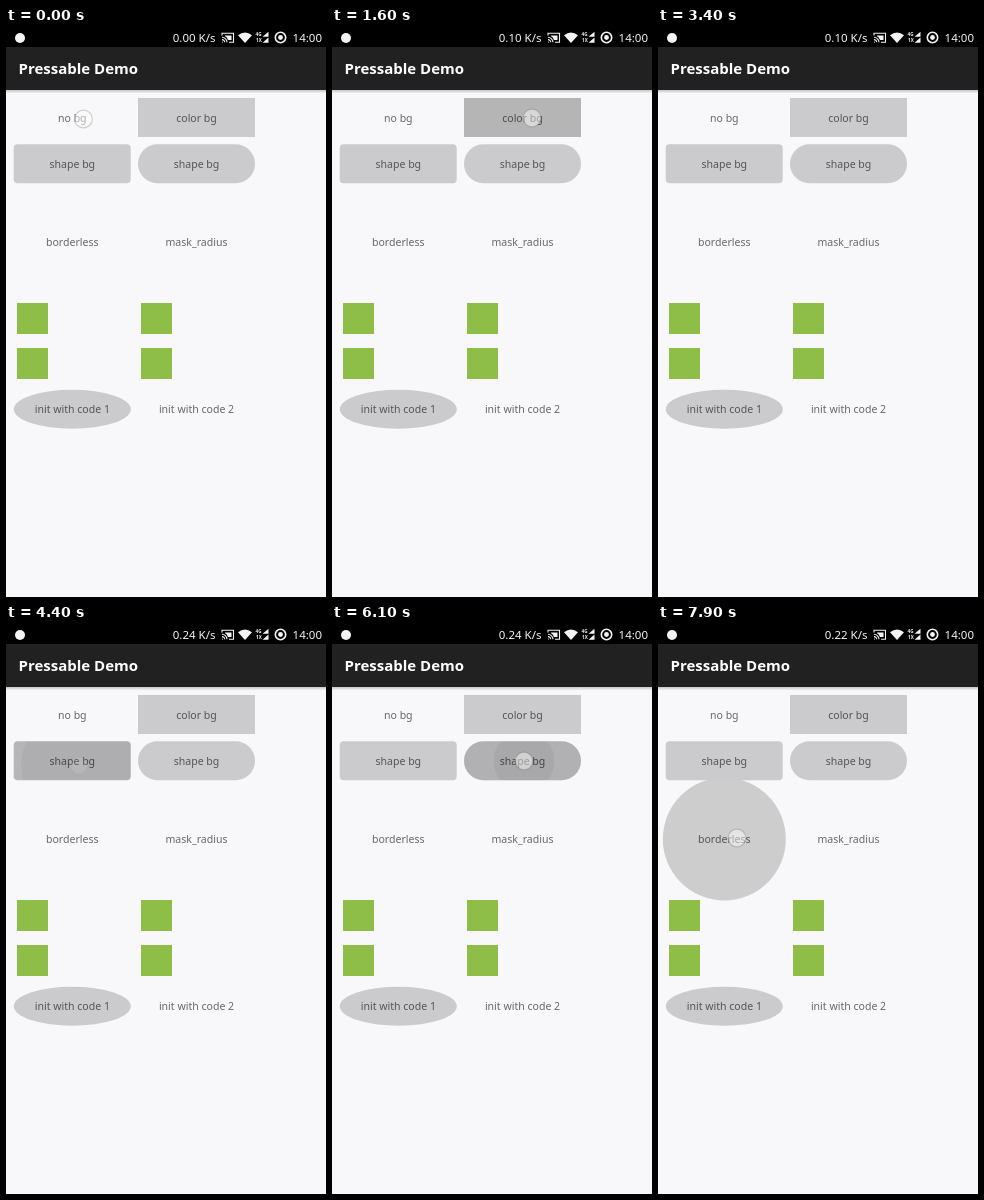
Recreate the animation shown at these times as an HTML page. Size 320 by 569 pixels, loop 8 s.

```html
<!DOCTYPE html>
<html lang="en">
<head>
<meta charset="utf-8">
<title>Pressable Demo</title>
<style>
  html, body { margin: 0; width: 100%; height: 100%; overflow: hidden; background: #f8f7f9; }
  svg { display: block; width: 100vw; height: 100vh; }
  text { font-family: "Noto Sans", "Open Sans", sans-serif; }
  .label { font-size: 10.55px; text-anchor: middle; fill: rgba(0, 0, 0, .58); }
  .status text { font-size: 11.5px; fill: #f4f4f4; }
  .status .tiny { font-size: 4.6px; font-weight: 700; }
  .title { font-size: 15px; font-weight: 700; fill: #fff; }
  .fill { fill: #cbcacc; }
  .icon { fill: #8fbe48; }
  .bg, .wave, .dot, .speed text { opacity: 0; }
  .wave { transform-box: fill-box; transform-origin: center; }
  .dot { fill: rgba(255, 255, 255, .48); stroke: rgba(110, 110, 115, .3); stroke-width: 1.2; }
</style>
</head>
<body>
<svg viewBox="0 0 320 569" preserveAspectRatio="none">
  <defs>
    <linearGradient id="shade" x2="0" y2="1">
      <stop offset="0" stop-color="#000" stop-opacity=".2"/>
      <stop offset="1" stop-color="#000" stop-opacity="0"/>
    </linearGradient>
    <rect id="plain" x="8" y="70" width="117" height="39"/>
    <rect id="solid" x="132" y="70" width="117" height="39"/>
    <rect id="soft" x="7.7" y="116.3" width="117" height="39" rx="4"/>
    <rect id="pill" x="132" y="116.3" width="117" height="39" rx="19.5"/>
    <circle id="round" cx="66.3" cy="214" r="61.5"/>
  </defs>

  <rect width="320" height="569" fill="#f8f7f9"/>
  <g id="under"></g>

  <g class="fill">
    <use href="#solid"/>
    <use href="#soft"/>
    <use href="#pill"/>
    <ellipse cx="66.3" cy="381.2" rx="58.5" ry="19.5"/>
  </g>
  <g class="icon">
    <rect x="11" y="275" width="31" height="31"/>
    <rect x="135" y="275" width="31" height="31"/>
    <rect x="11" y="320" width="31" height="31"/>
    <rect x="135" y="320" width="31" height="31"/>
  </g>
  <g id="ripples"></g>

  <g class="label">
    <text x="66.3" y="94">no bg</text>
    <text x="190.5" y="94">color bg</text>
    <text x="66.3" y="140">shape bg</text>
    <text x="190.5" y="140">shape bg</text>
    <text x="66.3" y="218">borderless</text>
    <text x="190.5" y="218">mask_radius</text>
    <text x="66.3" y="385.3">init with code 1</text>
    <text x="190.5" y="385.3">init with code 2</text>
  </g>

  <rect y="62" width="320" height="3.5" fill="url(#shade)"/>
  <rect y="19" width="320" height="43" fill="#222122"/>
  <text class="title" x="12.5" y="46">Pressable Demo</text>

  <g class="status">
    <rect width="320" height="19" fill="#000"/>
    <circle cx="14" cy="10" r="5" fill="#f4f4f4"/>
    <g class="speed" text-anchor="end">
      <text x="209.5" y="14">0.00 K/s</text>
      <text x="209.5" y="14">0.10 K/s</text>
      <text x="209.5" y="14">0.24 K/s</text>
      <text x="209.5" y="14">0.22 K/s</text>
    </g>
    <g fill="none" stroke="#f4f4f4" stroke-width="1.1">
      <path d="M216 7.5V5.2H227.5V14.3H223M216 9.3A5 5 0 0 1 221 14.3M216 11.6A2.7 2.7 0 0 1 218.7 14.3"/>
      <circle cx="274.5" cy="9.5" r="5.2" stroke-width="1.6"/>
    </g>
    <g fill="#f4f4f4">
      <path d="M219 7.5H225.5V12H222Q221 9 219 8.2ZM216 14.5V13.2L217.3 14.5Z"/>
      <path d="M232 7.2Q239 1.8 246 7.2L239 15Z"/>
      <path d="M262.5 3.8V8.8H256.5ZM262.5 9.6V14.8H256.5Z"/>
      <circle cx="274.5" cy="9.5" r="2.4"/>
    </g>
    <text class="tiny" x="249.5" y="8.3">4G</text>
    <text class="tiny" x="250" y="14.3">1X</text>
    <text x="316" y="14" text-anchor="end">14:00</text>
  </g>

  <g id="dots"></g>
</svg>
<script>
  const LOOP = 8000;
  const TAP_DELAY = 150;
  const FADE = 350;
  const FULL = 115;
  const BG_TINT = .125;
  const WAVE_TINT = .05;
  const $ = (id) => document.getElementById(id);

  // Each step is [time in ms, value]; the last step at or before 0 sets the opening state.
  function play(el, prop, steps) {
    const opening = steps.filter(([time]) => time <= 0).pop() || steps[0];
    const later = steps.filter(([time]) => time > 0);
    const closing = later[later.length - 1];
    const frames = [[0, opening[1]], ...later, [LOOP, closing[1]]].map(([time, value]) => ({
      offset: Math.min(time / LOOP, 1),
      [prop]: value
    }));
    el.animate(frames, { duration: LOOP, iterations: Infinity });
  }

  function add(parent, tag, attrs) {
    const el = document.createElementNS("http://www.w3.org/2000/svg", tag);
    for (const name in attrs) el.setAttribute(name, attrs[name]);
    return parent.appendChild(el);
  }

  // reach: wave radius when the finger lifts
  function press({ shape, x, y, down, up, reach, layer = "ripples" }) {
    const start = down + TAP_DELAY;
    const clip = add(document.querySelector("defs"), "clipPath", { id: shape + "-clip" });
    add(clip, "use", { href: "#" + shape });

    const bg = add($(layer), "use", { href: "#" + shape, class: "bg" });
    play(bg, "opacity", [[start, 0], [start + 300, BG_TINT], [up, BG_TINT], [up + FADE, 0]]);

    const holder = add($(layer), "g", { "clip-path": `url(#${shape}-clip)` });
    const wave = add(holder, "circle", { cx: x, cy: y, r: FULL, class: "wave" });
    play(wave, "opacity", [[start, 0], [start + 120, WAVE_TINT], [up, WAVE_TINT], [up + FADE, 0]]);
    play(wave, "transform", [[start, "scale(0)"], [up, `scale(${reach / FULL})`], [up + 250, "scale(1)"]]);

    const dot = add($("dots"), "circle", { cx: x, cy: y, r: 8.8, class: "dot" });
    play(dot, "opacity", [[down, 0], [down, 1], [up, 1], [up + 90, 0]]);
  }

  [
    { shape: "plain", x: 77.5, y: 91, down: -100, up: 900, reach: 85 },
    { shape: "solid", x: 200, y: 90, down: 1200, up: 2750, reach: 9 },
    { shape: "soft", x: 73, y: 140.5, down: 3550, up: 4330, reach: 35 },
    { shape: "pill", x: 192, y: 136, down: 5350, up: 6250, reach: 38 },
    { shape: "round", x: 79, y: 213, down: 7050, up: LOOP, reach: 95, layer: "under" }
  ].forEach(press);

  const changes = [0, 800, 3800, 6800, LOOP];
  document.querySelectorAll(".speed text").forEach((el, i) => {
    const [from, to] = [changes[i], changes[i + 1]];
    play(el, "opacity", [[from, 0], [from, 1], [to, 1], [to, 0]]);
  });
</script>
</body>
</html>
```
